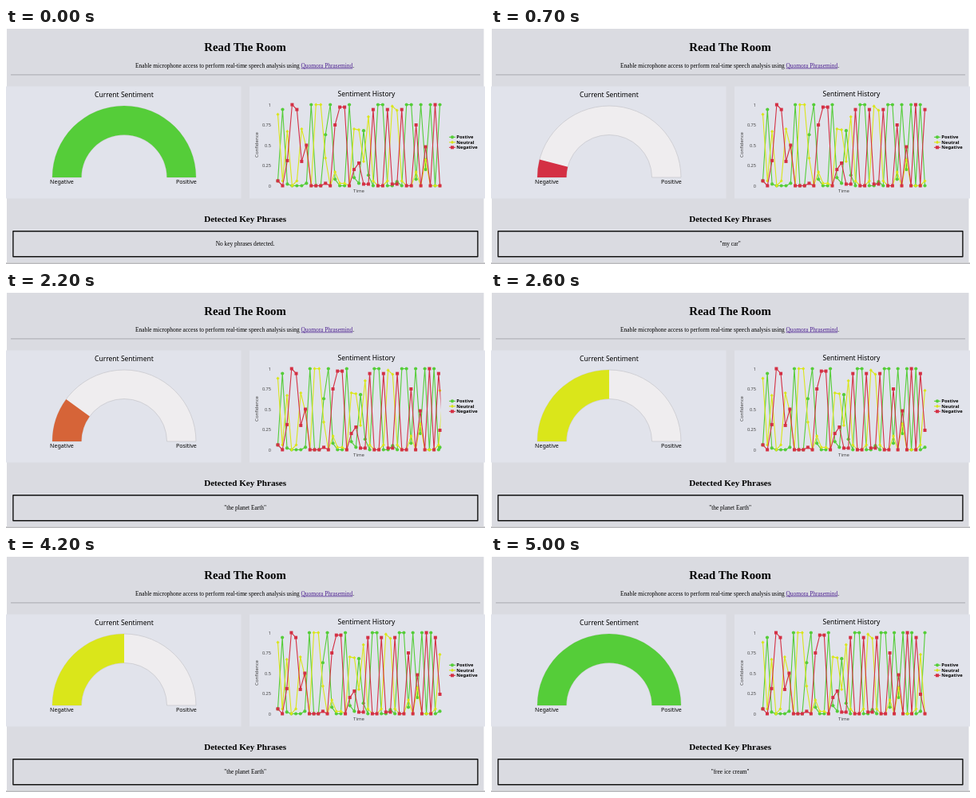
Write an HTML page with a canvas that moves like this. It is 600 px wide and 297 px high and loops after 5.1 s.

```html
<!DOCTYPE html>
<html lang="en">
<head>
<meta charset="utf-8">
<title>Read The Room</title>
<style>
  html, body { margin: 0; width: 100%; height: 100%; overflow: hidden; background: #fff; }
  canvas, svg { position: absolute; left: 0; top: 0; width: 600px; height: 297px; display: block; }
  .serif { font-family: "Liberation Serif", "Times New Roman", serif; font-size: 7.4px; fill: #000; }
  .sans { font-family: "Noto Sans", "Open Sans", sans-serif; font-size: 8.5px; fill: #000; }
  .mid { text-anchor: middle; }
  .end { text-anchor: end; }
  .bold { font-weight: bold; }
  .link { fill: #4f2493; text-decoration: underline; }
  .label { font-size: 7.1px; }
  .axis { font-size: 6px; fill: #444; }
  .tick { font-size: 5.6px; fill: #444; }
  .key { font-size: 5.8px; font-weight: bold; }
</style>
</head>
<body>
<canvas id="stage"></canvas>
<svg viewBox="0 0 600 297">
  <text class="serif mid bold" x="299.6" y="29" style="font-size:14.8px">Read The Room</text>
  <text class="serif" x="162" y="49.5">Enable microphone access to perform real-time speech analysis using <tspan class="link">Quomora Phrasemind</tspan>.</text>
  <text class="sans mid" x="148" y="87">Current Sentiment</text>
  <text class="sans label" x="55" y="195.7">Negative</text>
  <text class="sans label" x="213" y="195.7">Positive</text>
  <text class="sans mid" x="451.5" y="85.6">Sentiment History</text>
  <text class="sans axis mid" x="442" y="206.5">Time</text>
  <text class="sans axis mid" transform="translate(315.6 147) rotate(-90)">Confidence</text>
  <g class="sans tick end">
    <text x="332" y="99">1</text>
    <text x="332" y="124.3">0.75</text>
    <text x="332" y="149.8">0.5</text>
    <text x="332" y="175.3">0.25</text>
    <text x="332" y="200.8">0</text>
  </g>
  <g class="sans key">
    <text x="564.3" y="139.4">Postive</text>
    <text x="564.3" y="145.9">Neutral</text>
    <text x="564.3" y="152.4">Negative</text>
  </g>
  <text class="serif mid bold" x="299.6" y="244.3" style="font-size:11.1px">Detected Key Phrases</text>
  <text class="serif mid" id="phrase" x="299.6" y="274.2"></text>
</svg>
<script>
const LOOP = 5100, STEP = 100, EASE_MS = 500;
const GREEN = [85, 205, 57], YELLOW = [218, 230, 26], RED = [212, 48, 68];

// Confidence per sample; neutral takes what the other two leave.
const negative = [.06, 0, .31, 1, .94, .3, .5, 0, 0, 0, .03, 0, .75, .97, .97, 0, .2, .28, .02, .02,
  .94, 0, 0, .94, .02, .02, .94, 0, 0, .75, 0, .48, 0, 1, 0, .94, .24, 0];
const positive = [.06, .94, .02, 0, 0, 0, .03, 1, 0, 0, .63, 1, .08, 0, 0, 1, .1, .03, .68, .13,
  0, 1, 1, 0, 0, .05, 0, 1, 1, .08, 1, .2, 1, 0, 1, 0, .03, 1];
const neutral = negative.map((v, i) => Math.max(0, 1 - v - positive[i]));

const states = [
  { start: -EASE_MS, angle: 180, color: GREEN, phrase: 'No key phrases detected.' },
  { start: 50, angle: 14.4, color: RED, phrase: '"my car"' },
  { start: 2107, angle: 90, color: YELLOW, phrase: '"the planet Earth"' },
  { start: 4200, angle: 180, color: GREEN, phrase: '"free ice cream"' }
];
const FIRST_COUNT = 35;
const plot = { left: 340.5, right: 543.5, top: 96.5, bottom: 198.5 };

const canvas = document.getElementById('stage');
const phrase = document.getElementById('phrase');
const ctx = canvas.getContext('2d');
const dpr = window.devicePixelRatio || 1;
canvas.width = 600 * dpr;
canvas.height = 297 * dpr;
ctx.scale(dpr, dpr);

const rgb = c => `rgb(${c.map(Math.round).join()})`;
const mix = (a, b, p) => a + (b - a) * p;
const easeOut = n => Math.sin(Math.min(1, Math.max(0, n)) * Math.PI / 2);

function rect(color, x, y, w, h) {
  ctx.fillStyle = color;
  ctx.fillRect(x, y, w, h);
}

function drawPage() {
  rect('#fff', 0, 0, 600, 297);
  rect('#dadbe1', 1, 1, 597.5, 294);
  rect('#8a8a90', 0, 295.6, 600, 1);
  rect('#a9aab0', 6, 58.4, 588, 1);
  rect('#e1e3eb', 0, 73.5, 294.5, 141);
  rect('#e1e3eb', 305, 73.5, 295, 141);
  ctx.strokeStyle = '#111';
  ctx.lineWidth = 1.4;
  ctx.strokeRect(8.9, 255.7, 582, 32);
}

function ring(degrees) {
  const end = Math.PI * (1 + degrees / 180);
  ctx.beginPath();
  ctx.arc(148, 188, 90, Math.PI, end);
  ctx.arc(148, 188, 53.5, end, Math.PI, true);
  ctx.closePath();
}

function drawGauge(degrees, color) {
  ring(180);
  ctx.fillStyle = '#efedef';
  ctx.fill();
  ctx.strokeStyle = '#c9cacf';
  ctx.lineWidth = .8;
  ctx.stroke();
  ring(degrees);
  ctx.fillStyle = rgb(color);
  ctx.fill();
}

function dot(x, y) {
  ctx.beginPath();
  ctx.arc(x, y, 2.1, 0, 7);
  ctx.fill();
}

function diamond(x, y) {
  ctx.beginPath();
  ctx.moveTo(x, y - 2.2);
  ctx.lineTo(x + 2, y);
  ctx.lineTo(x, y + 2.2);
  ctx.lineTo(x - 2, y);
  ctx.fill();
}

function square(x, y) {
  ctx.fillRect(x - 2, y - 2, 4, 4);
}

const series = [
  { data: positive, color: GREEN, mark: dot },
  { data: neutral, color: YELLOW, mark: diamond },
  { data: negative, color: RED, mark: square }
];

function drawSeries({ data, color, mark }, count, gap) {
  const pts = data.slice(0, count).map((v, i) =>
    [plot.left + i * gap, mix(plot.bottom, plot.top, v)]);
  ctx.strokeStyle = ctx.fillStyle = rgb(color);
  ctx.lineWidth = 1.1;
  ctx.lineJoin = 'round';
  ctx.save();
  ctx.beginPath();
  ctx.rect(plot.left - 1, plot.top - 2, plot.right - plot.left + 2, plot.bottom - plot.top + 4);
  ctx.clip();
  ctx.beginPath();
  pts.forEach(p => ctx.lineTo(...p));
  ctx.stroke();
  ctx.restore();
  // The newest marker waits at the edge while its line slides in.
  pts.forEach(([x, y]) => mark(Math.min(x, plot.right), y));
}

function drawLegend() {
  series.forEach(({ color, mark }, i) => {
    const y = 137.3 + i * 6.5;
    rect(rgb(color), 555, y - .55, 8, 1.1);
    mark(559, y);
  });
}

function render(time) {
  const t = Math.floor(time / STEP) * STEP;
  let k = 0;
  while (k + 1 < states.length && t > states[k + 1].start) k++;
  const to = states[k], from = states[Math.max(0, k - 1)];
  const p = easeOut((t - to.start) / EASE_MS);
  const count = FIRST_COUNT + k;
  const width = plot.right - plot.left;
  const gap = mix(width / (count - (k ? 2 : 1)), width / (count - 1), p);

  drawPage();
  drawGauge(mix(from.angle, to.angle, p), from.color.map((c, i) => mix(c, to.color[i], p)));
  series.forEach(s => drawSeries(s, count, gap));
  drawLegend();
  if (phrase.textContent !== to.phrase) phrase.textContent = to.phrase;
}

const begin = performance.now();
function tick() {
  render((performance.now() - begin) % LOOP);
  requestAnimationFrame(tick);
}
tick();
</script>
</body>
</html>
```
